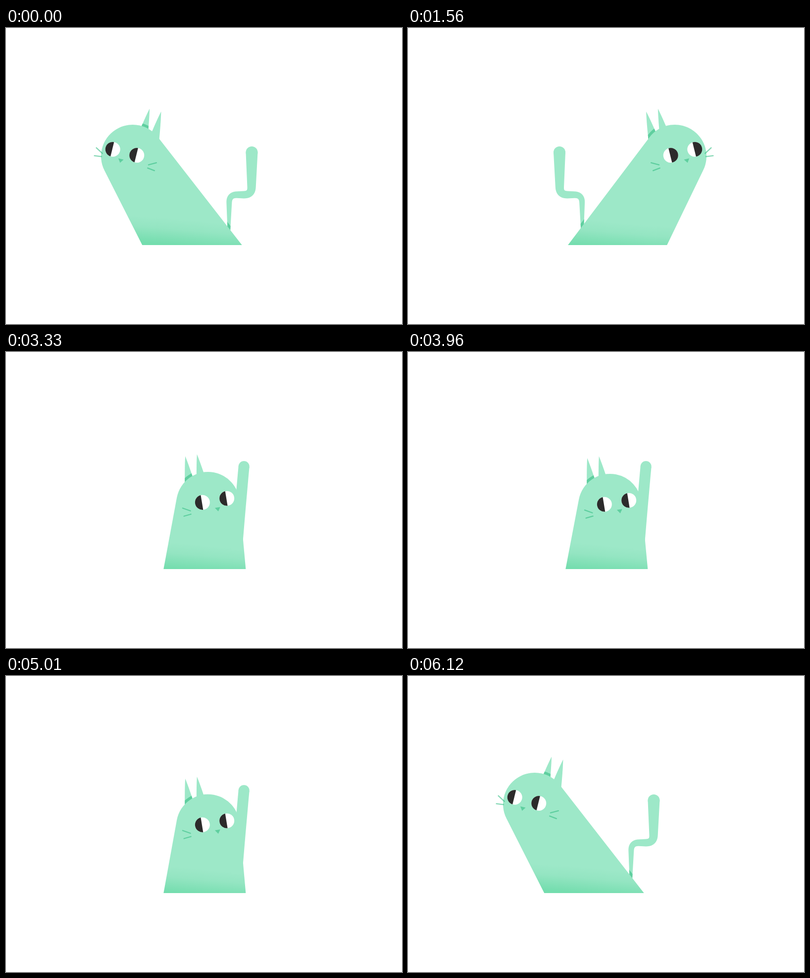
These frames come from a looping animation (800 px wide and 600 px high, 6150 ms). An HTML page with a canvas:

```html
<!DOCTYPE html>
<html lang="en">
<head>
<meta charset="utf-8">
<title>Cat</title>
<style>
html, body { margin: 0; width: 100%; height: 100%; overflow: hidden; background: #fff; }
canvas { display: block; }
</style>
</head>
<body>
<canvas id="stage" width="800" height="600"></canvas>
<script>
const ctx = document.getElementById('stage').getContext('2d');
const LOOP = 6150, STEP = 30, FLOOR = 440, R = 64, TAPER = 9.5;
const MINT = '#9de8c8', DARK = '#5fcf9f', INK = '#2c2b2b';
const RAD = Math.PI / 180;

// head x and y, turn (-1 to 1), tilt in degrees, nod, pupil side, lick strength
const LEFT   = [256, 260, -1, 14, 0, -1, 0];
const RIGHT  = [539, 260, 1, -14, 0, 1, 0];
const NOD    = [399, 330, 0.26, 14, 1, -1, 0];
const LICK   = [408, 307, 0.82, -9.3, 0, -1, 1];
const GLANCE = [396, 313, -0.49, 8, 0, -1, 0];

// spine from tip to root, half width at the tip, taper
const TAIL = [[[496.5, 252], [496, 338], [451, 338], [450.3, 416]], 12, TAPER];
const TAIL_R = [TAIL[0].map(([x, y]) => [802.5 - x, y]), 12, TAPER];
const LEG = [[[480.7, 232], [479.2, 248], [472, 330], [466, 402]], 11, 0];
const LEG_BENT = [[[475.2, 232], [472.7, 248], [469.5, 330], [466, 402]], 11, 0];

// each pose is held from one time to another and eased into the next
const HOLDS = [
  [0, 645, LEFT, TAIL],
  [1080, 2025, RIGHT, TAIL_R],
  [2550, 2640, NOD, LEG],
  [2940, 3960, LICK, LEG],
  [4320, 4500, GLANCE, LEG_BENT],
  [4740, 5790, LICK, LEG],
  [6120, LOOP, LEFT, TAIL]
];

const ease = u => u < 0.5 ? 4 * u ** 3 : 1 - (2 - 2 * u) ** 3 / 2;
const mix = (a, b, u) => Array.isArray(a) ? a.map((v, i) => mix(v, b[i], u)) : a + (b - a) * u;

function stateAt(t) {
  const i = HOLDS.findLastIndex(h => h[0] <= t);
  const [, end, pose, limb] = HOLDS[i];
  if (t <= end) return [pose, limb];
  const [next, , pose2, limb2] = HOLDS[i + 1];
  const u = ease((t - end) / (next - end));
  return [mix(pose, pose2, u), mix(limb, limb2, u)];
}

function bodyPath(cx, cy) {
  const mid = 400 + (cx - 400) / 6, half = 82 + Math.abs(cx - 400) * 0.13;
  const tangent = side => {
    const dx = mid - side * half - cx, dy = FLOOR - cy;
    return Math.atan2(dy, dx) + side * Math.acos(R / Math.hypot(dx, dy));
  };
  const p = new Path2D();
  p.moveTo(mid - half, FLOOR);
  p.arc(cx, cy, R, tangent(1), tangent(-1) + 2 * Math.PI);
  p.lineTo(mid + half, FLOOR);
  p.closePath();
  return p;
}

function earPath(head, x, y, twitch) {
  const ear = new Path2D('M0 0 Q-5 22 -11.5 66 L11.5 66 Q5 22 0 0Z');
  const p = new Path2D();
  p.addPath(ear, head.translate(x, y + 50).rotate(twitch).translate(0, -50));
  return p;
}

// spine with rounded corners
function roundSpine(pts) {
  const line = [pts[0]];
  for (let i = 1; i < pts.length - 1; i++) {
    const c = pts[i];
    const [a, b] = [pts[i - 1], pts[i + 1]].map(p =>
      mix(c, p, Math.min(0.5, 15.5 / Math.hypot(p[0] - c[0], p[1] - c[1]))));
    for (let u = 0; u < 1.01; u += 0.1) line.push(mix(mix(a, c, u), mix(c, b, u), u));
  }
  line.push(pts.at(-1));
  return line;
}

function limbPath([pts, tip, taper]) {
  const line = roundSpine(pts);
  const run = [0];
  for (let i = 1; i < line.length; i++)
    run.push(run[i - 1] + Math.hypot(line[i][0] - line[i - 1][0], line[i][1] - line[i - 1][1]));
  const one = [], two = [];
  line.forEach(([x, y], i) => {
    const a = line[Math.max(0, i - 1)], b = line[Math.min(line.length - 1, i + 1)];
    const dx = b[0] - a[0], dy = b[1] - a[1];
    const w = (tip - taper * run[i] / run.at(-1)) / (Math.hypot(dx, dy) || 1);
    one.push([x - dy * w, y + dx * w]);
    two.unshift([x + dy * w, y - dx * w]);
  });
  const p = new Path2D();
  one.concat(two).forEach(([x, y]) => p.lineTo(x, y));
  p.closePath();
  return p;
}

function fill(path, color) {
  ctx.fillStyle = color;
  ctx.fill(path);
}

function disc(x, y, r) {
  const p = new Path2D();
  p.arc(x, y, r, 0, 7);
  return p;
}

function drawLimb([pts, tip], path) {
  fill(path, MINT);
  fill(disc(...pts[0], tip), MINT);
}

// darker strip where a part goes behind the body
function shade(part, body, alpha) {
  ctx.save();
  ctx.clip(part);
  ctx.globalAlpha = alpha;
  ctx.strokeStyle = DARK;
  ctx.lineWidth = 11;
  ctx.stroke(body);
  ctx.restore();
}

function drawEye(x, look) {
  const eye = disc(x, 0, 15);
  fill(eye, '#fff');
  ctx.save();
  ctx.clip(eye);
  ctx.fillStyle = INK;
  ctx.fillRect(x - 1, -16, 17 * look, 32);
  ctx.restore();
}

function drawFace(head, turn, nod, look) {
  ctx.save();
  ctx.setTransform(head.translate(17.5 * turn, 12 * nod - 3.9));
  drawEye(-25, look);
  drawEye(25, look);

  const nx = 4.2 * turn, ny = 15 + 3 * nod;
  ctx.fillStyle = DARK;
  ctx.beginPath();
  ctx.moveTo(nx - 5.5, ny);
  ctx.lineTo(nx + 5.5, ny);
  ctx.lineTo(nx + 0.2, ny + 8);
  ctx.fill();

  ctx.translate(-4.6 * turn, -3 * nod);
  ctx.strokeStyle = 'rgba(53,190,132,0.6)';
  ctx.lineWidth = 2.3;
  ctx.lineCap = 'round';
  ctx.beginPath();
  for (const side of [-1, 1]) {
    ctx.moveTo(side * 62.5, 5);
    ctx.lineTo(side * 48, 13);
    ctx.moveTo(side * 62.5, 21.5);
    ctx.lineTo(side * 48, 19.8);
  }
  ctx.stroke();
  ctx.restore();
}

function draw(t) {
  const [[x, y, turn, tilt, nod, look, lick], limb] = stateAt(t);
  const cy = y + 5 * lick * Math.sin(2 * Math.PI * (t - 3330) / 465);
  const head = new DOMMatrix().translate(x, cy).rotate(tilt);
  const twitch = t > 1545 && t < 1710 ? -7 * Math.sin(Math.PI * (t - 1545) / 165) ** 2 : 0;
  const earX = -21.7 * turn, earY = -102 - 14.5 * nod;
  const body = bodyPath(x, cy), limbShape = limbPath(limb);
  const earL = earPath(head, earX - 12, earY, twitch);
  const earR = earPath(head, earX + 12, earY, 0);
  const tailness = limb[2] / TAPER, behind = tailness > 0.05;

  ctx.fillStyle = '#fff';
  ctx.fillRect(0, 0, 800, 600);
  ctx.save();
  ctx.beginPath();
  ctx.rect(0, 0, 800, FLOOR);
  ctx.clip();

  if (behind) {
    drawLimb(limb, limbShape);
    shade(limbShape, body, tailness);
  }
  fill(earL, MINT);
  shade(earL, body, 1);
  fill(earR, MINT);
  const g = ctx.createLinearGradient(400, 392, 395.5, 444);
  g.addColorStop(0, MINT);
  g.addColorStop(0.4, '#94e5c2');
  g.addColorStop(1, '#74ddae');
  fill(body, g);
  drawFace(head, turn, nod, look);
  if (!behind) drawLimb(limb, limbShape);
  ctx.restore();
}

const start = performance.now();
function tick() {
  const t = (performance.now() - start) % LOOP;
  draw(Math.floor(t / STEP) * STEP);
  requestAnimationFrame(tick);
}
tick();
</script>
</body>
</html>
```
